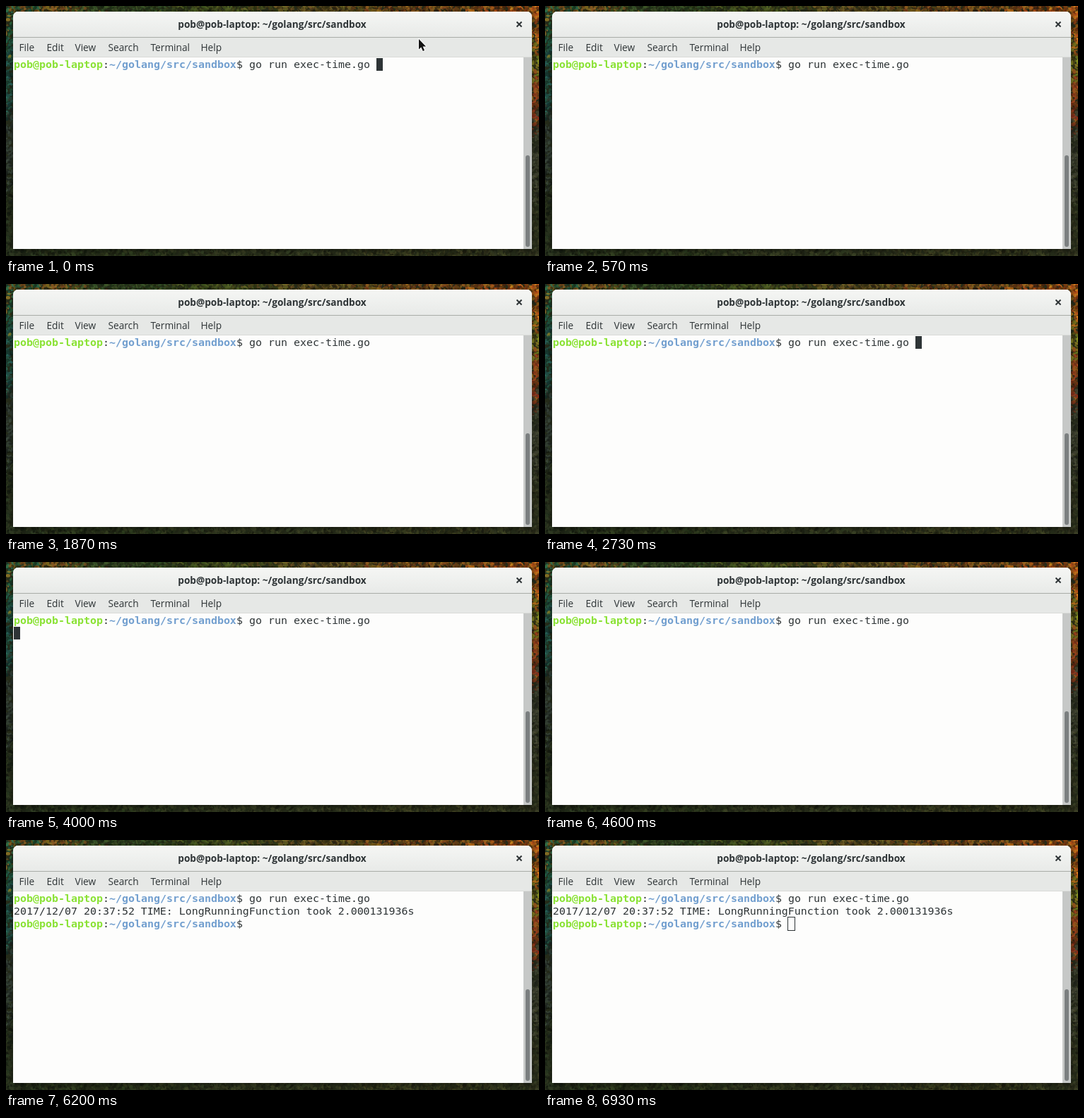
These frames come from a looping animation (754x355 px, 7.06 s). An HTML page with a canvas:

```html
<!DOCTYPE html>
<html lang="en">
<head>
<meta charset="utf-8">
<title>Terminal</title>
<style>
html, body { margin: 0; width: 100%; height: 100%; overflow: hidden; background: #262c1a; }
canvas { display: block; }
</style>
</head>
<body>
<canvas id="stage" width="754" height="355"></canvas>
<script>
const W = 754, H = 355, LOOP = 7060;
const ctx = document.getElementById('stage').getContext('2d');
const UI = '"Open Sans", "Noto Sans", sans-serif';
const MONO = '14.95px "DejaVu Sans Mono", "Noto Sans Mono", monospace';
const INK = '#2e3436', LIME = '#8ae234', BLUE = '#729fcf';
const LEFT = 11, TOP = 74, CELL = 9, ROW = 18;
const ENTER = 2800, OUTPUT = 5000, UNFOCUS = 6400, HALF = 600;

// Colour areas of the wallpaper: x, y, hue, saturation, lightness.
const AREAS = [
  [0, 20, 150, 45, 23], [0, 110, 165, 42, 21], [0, 200, 130, 10, 19], [0, 310, 90, 25, 14],
  [50, 0, 38, 60, 27], [150, 0, 95, 35, 20], [300, 0, 75, 45, 20], [430, 0, 45, 50, 23],
  [600, 0, 30, 65, 27], [754, 25, 27, 75, 34], [754, 85, 60, 60, 26], [754, 125, 22, 68, 29],
  [754, 210, 70, 15, 20], [754, 310, 70, 25, 15], [120, 355, 85, 32, 14],
  [380, 355, 75, 28, 15], [620, 355, 65, 32, 16]
];

function seeded(s) {
  return () => (s = (s * 16807) % 2147483647) / 2147483647;
}

function rect(c, x, y, w, h, fill) {
  c.fillStyle = fill;
  c.fillRect(x, y, w, h);
}

function text(c, str, x, y, font, fill, align = 'left') {
  c.font = font;
  c.fillStyle = fill;
  c.textAlign = align;
  c.fillText(str, x, y);
}

function gradient(c, y0, y1, a, b) {
  const g = c.createLinearGradient(0, y0, 0, y1);
  g.addColorStop(0, a);
  g.addColorStop(1, b);
  return g;
}

function areaAt(x, y) {
  const dist = a => Math.hypot(a[0] - x, a[1] - y);
  return AREAS.reduce((best, a) => dist(a) < dist(best) ? a : best);
}

// Autumn foliage, visible only around the window.
function foliage(c) {
  const rnd = seeded(4711);
  rect(c, 0, 0, W, H, '#262c1a');
  for (let i = 0; i < 3600; i++) {
    const side = rnd(), u = rnd(), v = rnd() * 11;
    let x = u * W, y = v - 1;
    if (side > 0.36) y = H - v;
    if (side > 0.68) { x = v - 1; y = u * H; }
    if (side > 0.84) x = W - v;
    const [, , hue, sat, light] = areaAt(x + (rnd() - 0.5) * 90, y + (rnd() - 0.5) * 50);
    c.fillStyle = `hsla(${hue + (rnd() - 0.5) * 24}, ${sat}%, ${light * (0.5 + rnd())}%, 0.75)`;
    c.beginPath();
    c.ellipse(x, y, 1 + rnd() * 3, 0.7 + rnd() * 1.8, rnd() * 3, 0, 7);
    c.fill();
  }
}

function frame(c) {
  c.save();
  c.shadowColor = 'rgba(0,0,0,0.45)';
  c.shadowBlur = 8;
  c.shadowOffsetY = 2;
  c.beginPath();
  c.roundRect(10, 8, 734, 337, [7, 7, 0, 0]);
  c.fillStyle = '#e6e8e6';
  c.fill();
  c.restore();

  c.save();
  c.beginPath();
  c.roundRect(10, 8, 734, 337, [7, 7, 0, 0]);
  c.clip();
  rect(c, 10, 8, 734, 36, gradient(c, 8, 44, '#f5f6f4', '#e8eae8'));
  rect(c, 10, 8, 734, 1, '#fdfdfb');
  rect(c, 10, 44, 734, 1, '#a9aca8');
  rect(c, 10, 45, 734, 28, '#e6e8e6');
  rect(c, 10, 72, 734, 1, '#d9dbd8');
  rect(c, 10, 73, 722, 272, '#fdfdfc');
  rect(c, 732, 73, 12, 272, '#c6c8c7');
  c.restore();

  c.beginPath();
  c.roundRect(735, 212, 6, 130, 3);
  c.fillStyle = '#7b7f80';
  c.fill();

  text(c, 'pob@pob-laptop: ~/golang/src/sandbox', 376.5, 31, `bold 13.65px ${UI}`, INK, 'center');
  const menu = { File: 18, Edit: 57, View: 97, Search: 144, Terminal: 204, Help: 275 };
  for (const name in menu) text(c, name, menu[name] + 0.5, 64, `13.7px ${UI}`, INK);

  c.strokeStyle = INK;
  c.lineWidth = 2;
  c.beginPath();
  c.moveTo(722.5, 22.5); c.lineTo(729.5, 29.5);
  c.moveTo(729.5, 22.5); c.lineTo(722.5, 29.5);
  c.stroke();
}

function put(col, row, str, fill = INK, weight = '') {
  text(ctx, str, LEFT + col * CELL, TOP + row * ROW + 14, `${weight} ${MONO}`, fill);
}

function prompt(row) {
  put(0, row, 'pob@pob-laptop', LIME, 'bold');
  put(14, row, ':');
  put(15, row, '~/golang/src/sandbox', BLUE, 'bold');
  put(35, row, '$');
}

function cursor(t) {
  const start = t < ENTER ? -150 : ENTER;
  const on = Math.floor((t - start) / HALF) % 2 === 0;
  const [col, row] = t < ENTER ? [57, 0] : t < OUTPUT ? [0, 1] : [37, 2];
  const x = LEFT + col * CELL, y = TOP + row * ROW;
  if (t >= UNFOCUS) {
    ctx.strokeStyle = INK;
    ctx.lineWidth = 1;
    ctx.strokeRect(x - 0.5, y - 0.5, CELL + 1, ROW + 1);
  } else if (on) {
    rect(ctx, x, y, CELL, ROW, INK);
  }
}

function pointer(t) {
  if (t > 700) return;
  const p = Math.max(0, (t - 30) / 670);
  const ease = p * p * (3 - 2 * p);
  ctx.save();
  ctx.translate(584 + 60 * ease, 47 - 72 * ease);
  ctx.beginPath();
  [[0, 0], [0, 14.5], [3.3, 11.4], [5.8, 17], [8, 16], [5.6, 10.6], [10, 10.4]]
    .forEach(([x, y]) => ctx.lineTo(x, y));
  ctx.closePath();
  ctx.lineJoin = 'round';
  ctx.lineWidth = 2;
  ctx.strokeStyle = '#fafafa';
  ctx.stroke();
  ctx.fillStyle = '#111';
  ctx.fill();
  ctx.restore();
}

const scene = document.createElement('canvas');
scene.width = W;
scene.height = H;
const sc = scene.getContext('2d');
foliage(sc);
frame(sc);

function draw(t) {
  ctx.drawImage(scene, 0, 0);
  prompt(0);
  put(37, 0, 'go run exec-time.go');
  if (t >= OUTPUT) {
    put(0, 1, '2017/12/07 20:37:52 TIME: LongRunningFunction took 2.000131936s');
    prompt(2);
  }
  cursor(t);
  pointer(t);
}

const begin = performance.now();
function tick() {
  draw((performance.now() - begin) % LOOP);
  requestAnimationFrame(tick);
}
draw(0);
requestAnimationFrame(tick);
</script>
</body>
</html>
```
